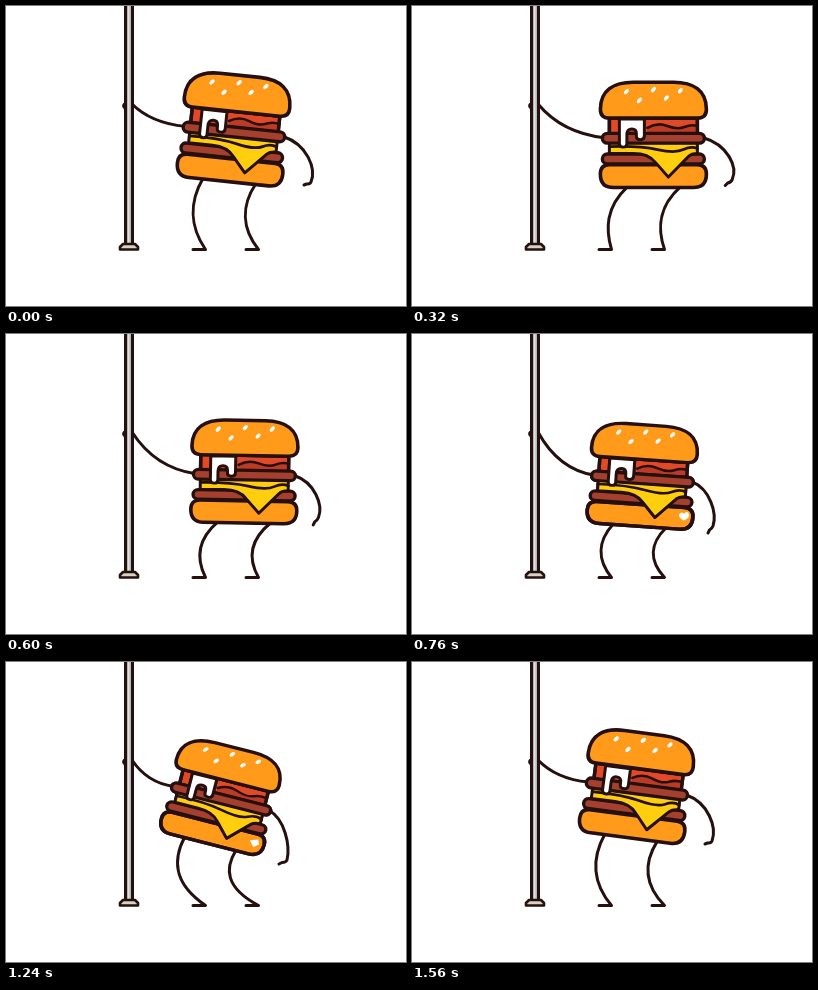
Animation of 400 by 300 pixels, one loop 1600 ms. Source, as an HTML page with a canvas:

```html
<!DOCTYPE html>
<html lang="en">
<head>
<meta charset="utf-8">
<title>Dancing burger</title>
<style>
html, body { margin: 0; width: 100%; height: 100%; overflow: hidden; background: #fff; }
canvas { display: block; width: 400px; height: 300px; }
</style>
</head>
<body>
<canvas id="stage"></canvas>
<script>
const LOOP = 1600, STEP = 40;
const INK = '#26100f', BUN = '#ff9a1a', MEAT = '#a5402f', CHEESE = '#ffcf0f',
      TOMATO = '#e24a27', WHITE = '#fff';

// time, body x, y, tilt, squash, knee x, wrist x, y, hand x, y
const POSES = [
  [0,    228,   125.5, 6,    1,   183.5, 305, 176, 298, 179],
  [160,  234.5, 127.2, 2.2,  1,   191,   314, 173, 306, 177],
  [440,  243.7, 135.5, -0.5, .97, 193.5, 321, 176, 315, 183],
  [760,  230.5, 144.5, 4,    .95, 185.3, 301, 192, 296, 199],
  [1040, 219.5, 144,   12,   .94, 171.7, 286, 202, 279, 207],
  [1240, 215.2, 136.5, 14.2, .93, 166.8, 281, 198, 273, 202],
  [1560, 225,   126.5, 7.5,  .99, 180,   300, 179, 293, 182]
];

const shape = d => new Path2D(d);
const topBun = shape('M-53-29C-53-48-40-56.5-20-56.5H20C40-56.5 53-48 53-29Q53-20 44-20H-44Q-53-20-53-29Z');
const lowBun = shape('M-44 27.5H44Q53 27.5 53 37Q53 50.5 40 50.5H-40Q-53 50.5-53 37Q-53 27.5-44 27.5Z');
const tomato = shape('M-44-20H44V-4H-44Z');
const bacon = shape('M-6-10Q4-16 14-12T31-11T44-12V-4H-6Z');
const baconEdge = shape('M-6-10Q4-16 14-12T31-11T44-12');
const cheese = shape('M-44 5H44V16Q38 16 35 19L15 40L2 25Q-5 16-20 16H-44Z');
const cheeseFold = shape('M-44 9Q-14 8 4 12T30 12T44 11');
const sauce = shape('M-34-19V6Q-34 9.5-30 9.5Q-26.5 9.5-26.5 6V-3Q-26.5-9-21.5-9Q-17-9-17-4V-1Q-17 2-13 2Q-9 2-9-2V-19Z');
const patty = y => {
  const p = new Path2D();
  p.roundRect(-51, y, 102, 10, 5);
  return p;
};
const patties = [patty(-4.5), patty(16.5)];
const seeds = [[-27, -47], [0, -49], [27, -48], [-14, -38], [13, -40.5]];

// glints on the buns: start, end, bun, area
const glints = [
  [400, 520, lowBun, shape('M-60 20H28L18 44V60H-60Z')],
  [400, 520, topBun, shape('M28-60L32-44L30-34L33-15H60V-60Z')],
  [720, 800, lowBun, shape('M39 35Q41 31 44 34Q47 30 49 34Q50 38 44 41Q39 39 39 35Z')],
  [1000, 1080, lowBun, shape('M-60 20H-30L-27 32L-34 38L-35 60H-60Z')],
  [1000, 1080, topBun, shape('M60-42H46L44-36L39-33L42-28L34-23L36-15H60Z')],
  [1200, 1280, lowBun, shape('M38 36L46 33L48 38L43 42Z')]
];

const canvas = document.getElementById('stage');
const c = canvas.getContext('2d');
const ratio = window.devicePixelRatio || 1;
canvas.width = 400 * ratio;
canvas.height = 300 * ratio;

// smooth periodic interpolation through the poses
function poseAt(t) {
  const n = POSES.length;
  const key = i => {
    const turn = Math.floor(i / n), p = POSES[i - turn * n];
    return [p[0] + turn * LOOP, ...p.slice(1)];
  };
  let i = n - 1;
  while (POSES[i][0] > t) i--;
  const [a, b, d, e] = [i - 1, i, i + 1, i + 2].map(key);
  const span = d[0] - b[0], u = (t - b[0]) / span, u2 = u * u, u3 = u2 * u;
  return b.slice(1).map((v, k) => {
    const j = k + 1;
    const m0 = (d[j] - a[j]) / (d[0] - a[0]) * span;
    const m1 = (e[j] - b[j]) / (e[0] - b[0]) * span;
    return (2 * u3 - 3 * u2 + 1) * v + (u3 - 2 * u2 + u) * m0 +
           (3 * u2 - 2 * u3) * d[j] + (u3 - u2) * m1;
  });
}

function fill(path, color) {
  c.fillStyle = color;
  c.fill(path);
}

function outline(path, width = 3.4) {
  c.strokeStyle = INK;
  c.lineWidth = width;
  c.stroke(path);
}

function part(path, color, width) {
  fill(path, color);
  outline(path, width);
}

function limb(...d) {
  outline(shape(d.join(' ')), 3);
}

function drawPole() {
  c.fillStyle = INK;
  c.fillRect(118, 0, 10, 239);
  c.fillStyle = '#b5b8b6';
  c.fillRect(121, 0, 4, 238);
  c.fillStyle = '#dfe2e0';
  c.fillRect(122, 0, 1.5, 238);
  part(shape('M117 238H129L132 241V243.5H114V241Z'), '#d5d3c4', 2.6);
}

function drawLegs(hips, knee) {
  hips.forEach(([x, y], i) => {
    const ankle = 199.5 + i * 53, k = knee + i * 52, h = 243 - y;
    limb('M', x, y, 'C', k, y + h * .33, k, y + h * .68, ankle, 243.5, 'H', ankle - 12.5);
  });
}

function drawArms([lx, ly], [rx, ry], wx, wy, hx, hy) {
  const dx = lx - 126, dy = ly - 98;
  limb('M118.5 98Q116.5 100 119 102');
  limb('M126 98C', 126 + dx * .22, 98 + dy * .52, lx - dx * .45, ly - dy * .1, lx, ly);
  const ex = wx - rx, ey = wy - ry;
  limb('M', rx, ry, 'C', rx + ex * .85, ry + ey * .17, wx + ex * .2, wy - ey * .3, wx, wy,
       'Q', wx - 1, wy + 2.5, (wx + hx) / 2 - 1, (wy + hy) / 2 + .5, 'L', hx, hy);
}

function drawBurger(t) {
  part(tomato, TOMATO);
  fill(bacon, '#bd3a25');
  outline(baconEdge, 2.6);
  outline(tomato);
  part(patties[1], MEAT);
  part(lowBun, BUN, 3.6);
  part(cheese, CHEESE, 3);
  outline(cheeseFold, 2.8);
  part(patties[0], MEAT);
  part(sauce, WHITE, 3);
  part(topBun, BUN, 3.6);
  for (const [x, y] of seeds) {
    const seed = new Path2D();
    seed.ellipse(x, y, 3.2, 1.8, -.9, 0, 7);
    fill(seed, WHITE);
  }
  for (const [from, to, bun, area] of glints) {
    if (t < from || t >= to) continue;
    c.save();
    c.clip(bun);
    fill(area, WHITE);
    c.restore();
    outline(bun, 3.6);
    if (bun === lowBun) part(cheese, CHEESE, 3), outline(cheeseFold, 2.8), part(patties[0], MEAT), part(sauce, WHITE, 3);
  }
}

function draw(t) {
  const [x, y, tilt, squash, knee, ...hand] = poseAt(t);
  const a = tilt * Math.PI / 180, cos = Math.cos(a), sin = Math.sin(a);
  const at = (u, v) => [x + u * cos - v * squash * sin, y + u * sin + v * squash * cos];
  c.setTransform(ratio, 0, 0, ratio, 0, 0);
  c.fillStyle = WHITE;
  c.fillRect(0, 0, 400, 300);
  c.lineCap = c.lineJoin = 'round';
  drawLegs([at(-26, 50), at(27, 50)], knee);
  drawArms(at(-49, 0), at(50, 0), ...hand);
  drawPole();
  c.translate(x, y);
  c.rotate(a);
  c.scale(1, squash);
  drawBurger(t);
}

const start = performance.now();
function tick() {
  const t = Math.max(0, performance.now() - start) % LOOP;
  draw(Math.floor(t / STEP) * STEP);
  requestAnimationFrame(tick);
}
tick();
</script>
</body>
</html>
```
